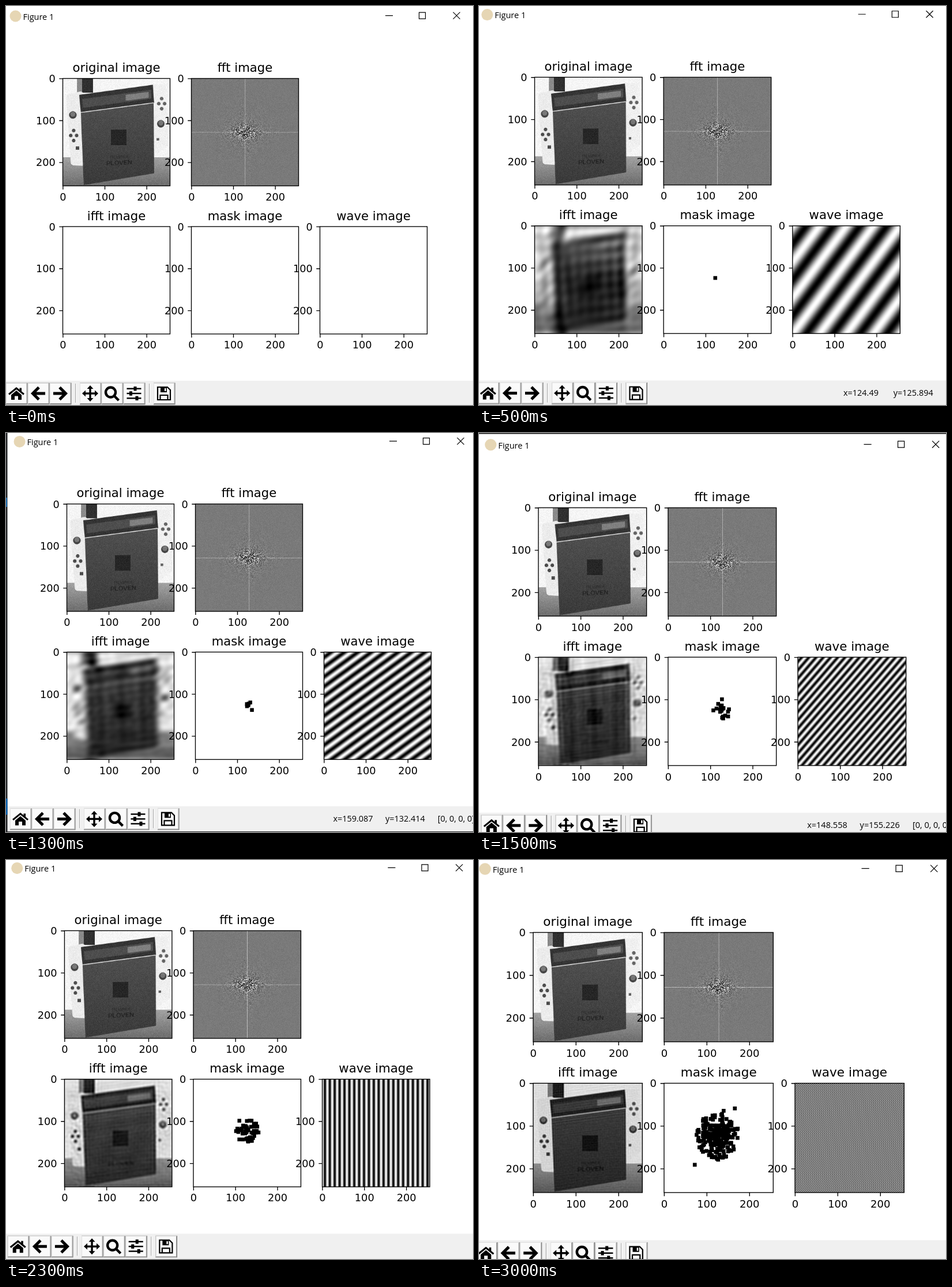
Write an HTML page with a canvas that moves like this. It is 810x691 px and loops after 3.5 s.

```html
<!DOCTYPE html>
<html lang="en">
<head>
<meta charset="utf-8">
<title>Figure 1</title>
<style>
html, body { margin: 0; width: 100%; height: 100%; overflow: hidden; background: #fff; }
canvas { display: block; }
</style>
</head>
<body>
<canvas id="stage" width="810" height="691"></canvas>
<script>
const N = 256, SIDE = 186, LEFT = 98.5, TOP = 125.5, COL = 223, ROW = 256.5, STEP_MS = 500;
const ctx = document.getElementById('stage').getContext('2d');

// Each step: window zoom and shift, wave frequency, new marks and how far they spread.
const steps = [
  { zoom: 1, dx: 0, dy: 0 },
  { zoom: 1.003, dx: -2.3, dy: -2.5, wave: [-4, -3], add: 0, spread: 0, mouse: [124.49, 125.894] },
  { zoom: 1, dx: 7, dy: -2.6, wave: [8, 11], add: 4, spread: 9, mouse: [159.087, 132.414], pixel: true },
  { zoom: 1.009, dx: 3.6, dy: 2.8, wave: [15, 13], add: 12, spread: 21, mouse: [148.558, 155.226], pixel: true },
  { zoom: 1.0025, dx: 2.7, dy: -3.4, wave: [22, 0], add: 29, spread: 30 },
  { zoom: 1.009, dx: -0.4, dy: -1.6, wave: [39, -68], add: 38, spread: 54, mouse: [155.577, 79.7684], pixel: true },
  { zoom: 1.018, dx: -6.3, dy: -2.3, wave: [-55, 64], add: 130, spread: 50 }
];

function seeded(seed) {
  return () => {
    seed = (seed + 0x6D2B79F5) | 0;
    let t = Math.imul(seed ^ (seed >>> 15), 1 | seed);
    t = (t + Math.imul(t ^ (t >>> 7), 61 | t)) ^ t;
    return ((t ^ (t >>> 14)) >>> 0) / 4294967296;
  };
}

function tile() {
  const c = document.createElement('canvas');
  c.width = c.height = N;
  return c;
}

// Grey picture from a function of column, row and index.
function grey(shade) {
  const c = tile(), g = c.getContext('2d'), img = g.createImageData(N, N);
  for (let i = 0; i < N * N; i++) {
    const v = shade(i % N, i >> 8, i);
    img.data.set([v, v, v, 255], i * 4);
  }
  g.putImageData(img, 0, 0);
  return c;
}

function drawScene() {
  const c = tile(), g = c.getContext('2d');
  const fade = (y0, y1, a, b) => {
    const s = g.createLinearGradient(0, y0, 0, y1);
    s.addColorStop(0, a);
    s.addColorStop(1, b);
    return s;
  };
  const box = (fill, x, y, w, h) => { g.fillStyle = fill; g.fillRect(x, y, w, h); };
  // Upright shape whose corners are rounded by a thick outline.
  const slab = (fill, [x0, a, b], [x1, c, d], [x2, x3], round = 0) => {
    g.fillStyle = g.strokeStyle = fill;
    g.lineWidth = round || 0.01;
    g.lineJoin = 'round';
    g.beginPath();
    g.moveTo(x0, a);
    g.lineTo(x1, c);
    g.lineTo(x3, d);
    g.lineTo(x2, b);
    g.closePath();
    g.fill();
    g.stroke();
  };
  const dot = (x, y, r, fill) => {
    g.fillStyle = fill;
    g.beginPath();
    g.arc(x, y, r, 0, 7);
    g.fill();
  };
  const stick = (x, y) => { dot(x, y, 9, '#444'); dot(x, y - 2, 6, '#777'); };
  const diamond = (x, y, fill) => {
    for (let a = 0; a < 4; a++) dot(x + 7 * Math.cos(a * Math.PI / 2), y + 12 * Math.sin(a * Math.PI / 2), 4.3, fill);
  };

  box('#f6f6f6', 0, 0, N, N);
  box('#8a8a8a', 34, 0, 12, 34);
  box('#303030', 46, 0, 26, 34);
  box(fade(190, N, '#a2a2a2', '#6c6c6c'), 0, 188, N, N);

  slab('#ececec', [15, 44, 200], [42, 38, 201], [26, 46], 14);
  slab('#f0f0f0', [217, 21, 178], [240, 21, 155], [217, 246], 14);
  stick(24, 87);
  diamond(26, 136, '#4c4c4c');
  box('#4c4c4c', 31, 162, 8, 8);
  stick(234, 108);
  diamond(236, 60, '#666');
  box('#666', 224, 142, 6, 6);

  slab('#343434', [39, 39, 81], [215, 15, 58], [43, 218]);
  slab('#4e4e4e', [46, 49, 70], [211, 27, 48], [48, 211]);
  slab('#808080', [150, 39, 53], [205, 32, 46], [150, 205]);
  slab('#dedede', [43, 80, 84], [217, 57, 61], [43, 217]);
  slab(fade(60, 254, '#505050', '#3a3a3a'), [43, 82, 254], [217, 59, 226], [50, 218]);
  box('#262626', 115, 122, 37, 37);
  g.translate(134, 190);
  g.rotate(-0.05);
  g.fillStyle = '#262626';
  g.textAlign = 'center';
  g.font = '9px "Liberation Sans", sans-serif';
  g.fillText('TALMIREX', 0, 0);
  g.font = 'bold 15px "Liberation Sans", sans-serif';
  g.fillText('PLOVEN', 0, 16);

  const px = g.getImageData(0, 0, N, N).data, rand = seeded(5);
  return Float64Array.from({ length: N * N }, (_, i) =>
    Math.max(0, Math.min(255, px[i * 4] + (rand() - 0.5) * 26)));
}

function fftLine(re, im, o, s) {
  for (let i = 0, j = 0; i < N; i++) {
    if (i < j) {
      const a = o + i * s, b = o + j * s;
      [re[a], re[b]] = [re[b], re[a]];
      [im[a], im[b]] = [im[b], im[a]];
    }
    let m = N >> 1;
    while (m && j & m) { j ^= m; m >>= 1; }
    j |= m;
  }
  for (let half = 1; half < N; half *= 2) {
    for (let k = 0; k < half; k++) {
      const c = Math.cos(Math.PI * k / half), d = -Math.sin(Math.PI * k / half);
      for (let i = k; i < N; i += half * 2) {
        const a = o + i * s, b = a + half * s;
        const r = re[b] * c - im[b] * d, q = re[b] * d + im[b] * c;
        re[b] = re[a] - r; im[b] = im[a] - q;
        re[a] += r; im[a] += q;
      }
    }
  }
}

function fft2(re, im) {
  for (let i = 0; i < N; i++) fftLine(re, im, i * N, 1);
  for (let i = 0; i < N; i++) fftLine(re, im, i, N);
}

// Rebuilds the picture from the frequencies near the marks.
function rebuild(spec, marks) {
  const re = new Float64Array(N * N), im = new Float64Array(N * N);
  for (const [x, y] of marks) {
    for (let v = -5; v <= 5; v++) for (let u = -5; u <= 5; u++) {
      const k = ((Math.round(y) + v - 128) & 255) * N + ((Math.round(x) + u - 128) & 255);
      re[k] = spec.re[k];
      im[k] = spec.im[k];
    }
  }
  fft2(im, re);
  let lo = Infinity, hi = -Infinity;
  for (const v of re) { lo = Math.min(lo, v); hi = Math.max(hi, v); }
  return grey((x, y, i) => 255 * (re[i] - lo) / (hi - lo));
}

function drawSpectrum() {
  const rand = seeded(11);
  return grey((x, y) => {
    const u = x - 128, v = y - 128, r = Math.hypot(u, v);
    const amp = 9 + 42 * Math.exp(-r / 30)
      + 620 * Math.exp(-Math.hypot(u / 1.4, v) / 8)
      + 90 * Math.exp(-Math.abs(u) / 36 - Math.abs(v) / 6)
      + 45 * Math.exp(-Math.abs(u - v * 0.13) / 3 - Math.abs(v) / 55);
    const line = u === 0 ? 85 : v === 0 ? 66 : 0;
    return 122 + line + amp * (rand() * 2 - 1);
  });
}

const drawWave = ([fx, fy]) => grey((x, y) =>
  127.5 + 127.5 * Math.cos(2 * Math.PI * (fx * x + fy * y) / N));

const light = drawScene();
const photo = grey((x, y, i) => light[i]);
const spectrum = drawSpectrum();
const spec = { re: light.slice(), im: new Float64Array(N * N) };
fft2(spec.re, spec.im);

// Marks pile up around the middle; the last one of a step sets its wave.
const rand = seeded(23), marks = [];
for (const s of steps) {
  if (s.wave) {
    for (let n = 0; n < s.add; n++) {
      const r = s.spread * rand() ** 0.65, a = rand() * 2 * Math.PI;
      marks.push([125.5 + r * Math.cos(a), 122 + 1.12 * r * Math.sin(a)]);
    }
    marks.push(s.wave.map(f => 127 + f));
    s.back = rebuild(spec, marks);
    s.waves = drawWave(s.wave);
  }
  s.marks = marks.slice();
}

function text(str, x, y, size, align = 'left', font = '"DejaVu Sans"') {
  ctx.font = `${size}px ${font}, sans-serif`;
  ctx.textAlign = align;
  ctx.fillStyle = '#000';
  ctx.fillText(str, x, y);
}

function bar(fill, x, y, w, h) {
  ctx.fillStyle = fill;
  ctx.fillRect(x, y, w, h);
}

function axes(title, col, row, img, dots = []) {
  const x = LEFT + col * COL, y = TOP + row * ROW, s = SIDE / N;
  if (img) ctx.drawImage(img, x, y, SIDE, SIDE);
  for (const [u, v] of dots) bar('#000', x + (u - 4.5) * s, y + (v - 4.5) * s, 9 * s, 9 * s);
  ctx.strokeStyle = '#000';
  ctx.lineWidth = 1.35;
  ctx.strokeRect(x, y, SIDE, SIDE);
  ctx.beginPath();
  for (let n = 0; n < N; n += 100) {
    const d = (n + 0.5) * s;
    ctx.moveTo(x - 6.2, y + d);
    ctx.lineTo(x, y + d);
    ctx.moveTo(x + d, y + SIDE);
    ctx.lineTo(x + d, y + SIDE + 6.2);
    text(n, x - 12.8, y + d + 6.3, 17.7, 'right');
    text(n, x + d, y + SIDE + 25.4, 17.7, 'center');
  }
  ctx.stroke();
  text(title, x + SIDE / 2, y - 11.5, 21.2, 'center');
}

function shape(path, width) {
  const p = new Path2D(path);
  ctx.lineWidth = width;
  if (width) ctx.stroke(p);
  else ctx.fill(p, 'evenodd');
}

const arrow = () => shape('M12 0H-9M1-10.5L-9.5 0L1 10.5', 5);
const icons = [
  () => {
    shape('M-9 2.5L0-5L9 2.5V11H3V4.5H-3V11H-9ZM5.5-9.5H9V-2L5.5-5Z');
    shape('M-13 1.5L0-9L13 1.5', 3);
  },
  arrow,
  () => { ctx.scale(-1, 1); arrow(); },
  () => {
    for (let i = 0; i < 4; i++) {
      shape('M0 0H10', 3.4);
      shape('M14 0L8-5.5V5.5Z');
      ctx.rotate(Math.PI / 2);
    }
  },
  () => shape('M6-2A8.5 8.5 0 1 1-11-2A8.5 8.5 0 1 1 6-2M4 4.5L11.5 12', 4.4),
  () => {
    for (let i = -1; i < 2; i++) {
      bar('#000', -12.5, i * 8.3 - 1.2, 25, 2.4);
      bar('#000', i ? 1 + 1.5 * i : -8, i * 8.3 - 3.7, 5, 7.4);
    }
  },
  () => {
    shape('M-6-11H5V-2H-6ZM1-9V-4H3.5V-9Z');
    shape('M-11-11H6L11-6V11H-11ZM-6.5 11V3H6.5V11', 2.2);
  }
];

function toolbar({ mouse, pixel }) {
  bar('#f0f0f0', -20, 649, 860, 60);
  icons.forEach((icon, i) => {
    const group = Math.floor(i / 3), x = 18.5 + 38 * i + 14 * group;
    if (group && i % 3 === 0) {
      bar('#a6a6a6', x - 26.5, 654, 1.2, 33);
      bar('#fff', x - 25.3, 654, 1, 33);
    }
    bar('#696969', x - 18.5, 652.5, 37.5, 37.5);
    bar('#e3e3e3', x - 18.5, 652.5, 36.5, 36.5);
    bar('#a0a0a0', x - 17.5, 653.5, 35.5, 35.5);
    bar('#fafafa', x - 17.5, 653.5, 34.5, 34.5);
    ctx.save();
    ctx.translate(x - 0.5, 671);
    ctx.fillStyle = ctx.strokeStyle = '#000';
    icon();
    ctx.restore();
  });
  if (!mouse) return;
  const [from, pitch] = pixel ? [560.5, 90.6] : [632.4, 86.5];
  const parts = [`x=${mouse[0]}`, `y=${mouse[1]}`, pixel ? '[0, 0, 0, 0]' : ''];
  parts.forEach((s, i) => text(s, from + pitch * i, 675.5, 14.4, 'left', '"Open Sans"'));
}

function titleBar() {
  ctx.fillStyle = '#e6d6b4';
  ctx.beginPath();
  ctx.arc(16.5, 17.5, 10, 0, 7);
  ctx.fill();
  text('Figure 1', 29.5, 23.7, 14.5, 'left', '"Open Sans"');
  ctx.strokeStyle = '#000';
  shape('M658 16.7H671M716.5 11.2H727.5V22.2H716.5ZM775.5 10.7L787.5 22.7M787.5 10.7L775.5 22.7', 1.2);
}

// Slivers of the desktop beside the window.
function desktop({ dx, dy }) {
  if (dx > 5) {
    bar('#232427', 0, 0, 2.5, 691);
    bar('#232427', 0, 690, 810, 1);
    bar('#1f6fb5', 0, 112, 2, 16);
    bar('#0a64b4', 0, 633, 2.5, 28);
  }
  if (dy > 1) bar('#2b2b2b', 0, 0, 810, 1.7);
}

function draw(s) {
  ctx.setTransform(1, 0, 0, 1, 0, 0);
  bar('#fff', 0, 0, 810, 691);
  ctx.setTransform(s.zoom, 0, 0, s.zoom, s.dx, s.dy);
  titleBar();
  axes('original image', 0, 0, photo);
  axes('fft image', 1, 0, spectrum);
  axes('ifft image', 0, 1, s.back);
  axes('mask image', 1, 1, null, s.marks);
  axes('wave image', 2, 1, s.waves);
  toolbar(s);
  ctx.setTransform(1, 0, 0, 1, 0, 0);
  desktop(s);
}

let shown = -1;
const start = performance.now();
function tick() {
  const i = Math.floor((performance.now() - start) / STEP_MS) % steps.length;
  if (i !== shown) draw(steps[shown = i]);
  requestAnimationFrame(tick);
}
tick();
</script>
</body>
</html>
```
